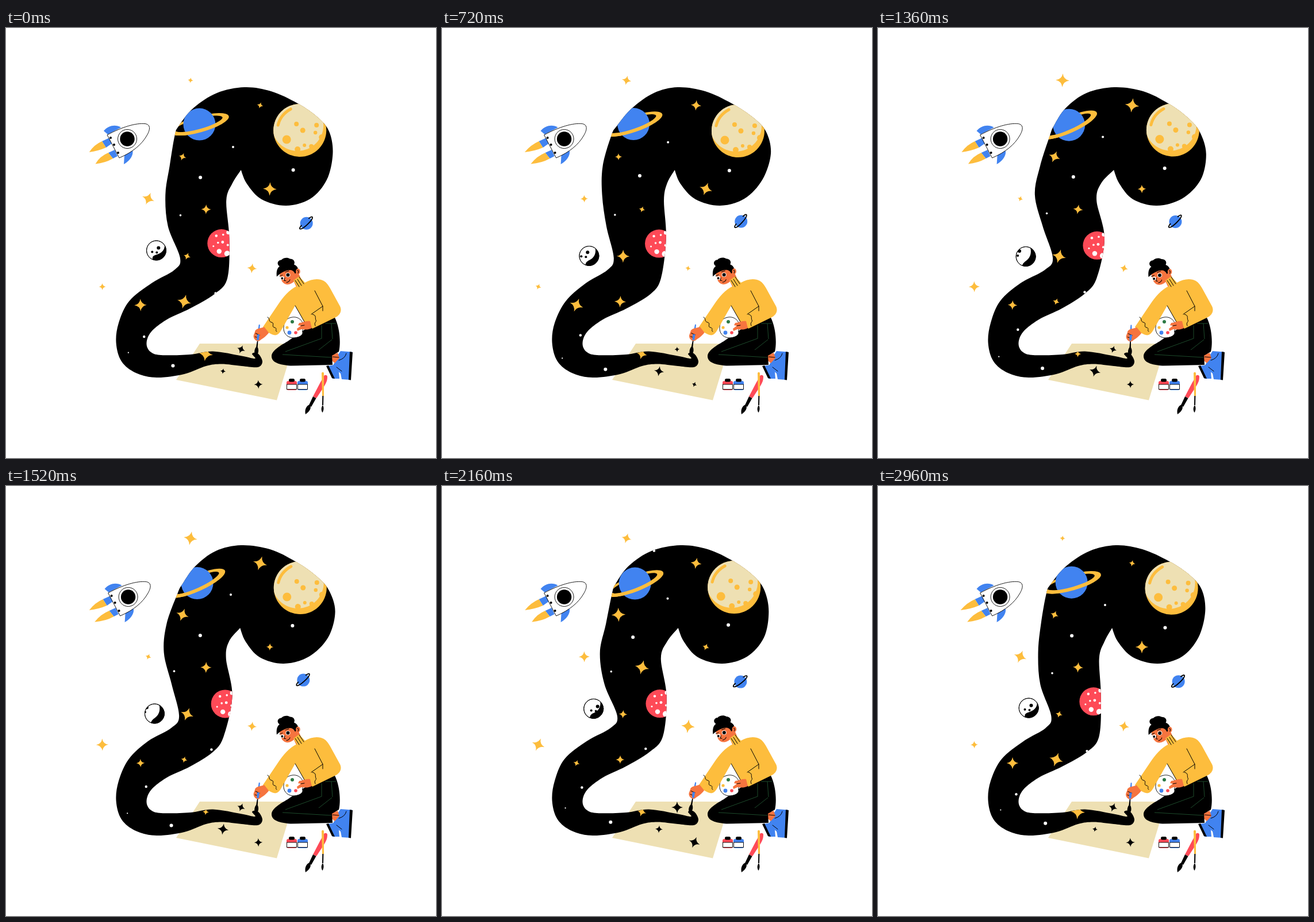
Recreate the animation shown at these times as an HTML page. Size 748x748 px, loop 3.04 s.

```html
<!DOCTYPE html>
<html lang="en">
<head>
<meta charset="utf-8">
<title>Painting space</title>
<style>
html, body { margin: 0; width: 100%; height: 100%; overflow: hidden; background: #fff; }
svg { display: block; width: 100vw; height: 100vh; }
.g { fill: #fdbd3d; } .b { fill: #4183f0; } .r { fill: #fe4a57; } .c { fill: #eee0b3; }
.o { fill: #f6743f; } .w { fill: #fff; } .k { fill: #000; }
.l { fill: none; stroke: #000; stroke-width: 1; stroke-linecap: round; stroke-linejoin: round; }
.d { fill: none; stroke: #1d4a2b; stroke-width: 1; }
.ol { stroke: #000; stroke-width: .9; }
</style>
</head>
<body>
<svg viewBox="0 0 748 748">
  <defs>
    <clipPath id="inBlob"><path id="blobClip"/></clipPath>
    <clipPath id="inMoon"><circle r="17"/></clipPath>
    <clipPath id="inGold"><circle r="46"/></clipPath>
    <clipPath id="inRed"><circle r="24.5"/></clipPath>
    <clipPath id="front"><rect x="-70" y="1" width="140" height="40"/></clipPath>
    <path id="ring" fill-rule="evenodd" d="M-53 0A53 14 0 0 1 53 0A53 14 0 0 1 -53 0ZM-44 -1A43 9 0 0 0 42 -1A43 9 0 0 0 -44 -1Z"/>
    <path id="star" d="M0 -1Q.14 -.14 1 0Q.14 .14 0 1Q-.14 .14 -1 0Q-.14 -.14 0 -1Z"/>
  </defs>

  <path class="c" d="M337 549H501L471 647.5L296 612Z"/>
  <path id="blob"/>

  <g clip-path="url(#inBlob)">
    <g id="saturn">
      <g class="tilt"><use href="#ring" class="g"/></g>
      <circle class="b" r="28"/>
      <g class="tilt"><g clip-path="url(#front)"><use href="#ring" class="g"/></g></g>
    </g>
    <g id="gold">
      <circle class="g" r="46"/>
      <g clip-path="url(#inGold)">
        <circle class="c" cx="-4" cy="-9" r="45"/>
        <g id="goldSpots" class="g"></g>
        <path d="M-38 -9Q-34 -27 -16 -37" fill="none" stroke="#fdbd3d" stroke-width="5" stroke-linecap="round"/>
      </g>
    </g>
    <g id="red">
      <circle class="r" r="24.5"/>
      <g id="redSpots" class="w" clip-path="url(#inRed)"></g>
    </g>
    <g id="dots" class="w"></g>
    <g id="inner" class="g"></g>
  </g>
  <g id="outer" class="g"></g>
  <g id="ink" class="k"></g>

  <g id="moon">
    <circle class="w ol" r="17"/>
    <g clip-path="url(#inMoon)">
      <path id="shade"/>
      <g id="craters"><circle r="3"/><circle cx="-11" cy="7" r="2"/><circle cx="-3" cy="8" r="2"/></g>
    </g>
    <circle class="l" r="17"/>
  </g>

  <g id="mini">
    <circle class="b" r="11"/>
    <path id="miniRing" class="l" d="M-9 -3.4C-18 -3 -18 2.5 0 2.5S18 -3 9 -3.4" style="stroke-width:1.8"/>
  </g>

  <g id="rocket">
    <path class="b" d="M170 179C179 168 192 168 200 173L177 185ZM205 237L206 221L219 210C224 219 216 231 205 237Z"/>
    <path class="b" d="M167 197L180 191L184 201L174 208ZM178 217L189 212L194 223L186 227Z"/>
    <path id="flames" class="g"/>
    <path class="w ol" d="M176 186C202 172 226 165 242 166.500C252 168 251 177 245 187C236 203 220 216 197 226Z"/>
    <circle class="w ol" cx="211" cy="193" r="16.500"/><circle cx="211" cy="193" r="12.700"/>
    <circle cx="182" cy="191" r="2"/><circle cx="188" cy="203" r="2"/><circle cx="195" cy="217" r="2"/>
  </g>

  <!-- boots, legs -->
  <path class="b" d="M559 588L571 586L579 598L580 610L568 610Z"/>
  <path d="M557 588L561 587L572 610L567 609Z"/>
  <path class="b" d="M576 571L582 562L602 563.500L599 612L584 611L582 601L568 588L573 580Z"/>
  <path d="M598 563L603 564L600 612.500L596 612Z"/>
  <path class="l" d="M579 578Q590 575 592 566M575 590L584 597"/>
  <path class="o" d="M566 569L577 565L580 574L572 583L566 578Z"/>
  <path class="l" d="M568 572L579 573"/>
  <path d="M526 520L571 502C580 518 583 546 579 563L567 570L568 586L495 587.500C476 586 462 582 462 571C462 561 478 552 490 545Z"/>
  <path class="d" d="M549 517V540L486 563M555 514H574M566 514L568 541M481 568L566 573M567 542L544 560"/>

  <!-- palette -->
  <path class="w ol" d="M494 504C506 500 515 507 517 516C519 524 514 525 516 529C517 535 508 539 499 539C488 538 482 530 483 520C484 511 488 506 494 504Z"/>
  <circle cx="498" cy="511" r="3" fill="#2c7a45"/><circle class="g" cx="489" cy="521" r="2.600"/>
  <circle class="b" cx="493" cy="530" r="3.400"/><circle class="r" cx="504" cy="530" r="2.800"/>

  <g id="head">
    <path class="o" d="M497 432L508 424L517 444L506 452Z"/>
    <path class="o" d="M475 425L480 440C484 446 490 447 496 444C503 441 506 434 506 427L504 416L483 415Z"/>
    <path d="M471 432C470 422 472 417 476 414C470 410 473 403 479 403C482 399 490 398 494 401C500 401 504 406 501 411C506 413 509 417 508 422L503 427C499 418 491 420 484 423C479 425 475 428 471 432Z"/>
    <ellipse class="o" cx="508" cy="423" rx="3.800" ry="5"/>
    <path class="l" d="M507 421Q510 422 508 426M485 434L484 439L487 439M476 431L481 429M486 424L492 422M488 442Q493 441 494 437"/>
    <g id="open">
      <ellipse class="w" cx="481" cy="434.500" rx="3" ry="3.200"/><circle cx="480.500" cy="435" r="2"/>
      <ellipse class="w" cx="490.500" cy="429" rx="4" ry="3.800"/><circle cx="490.500" cy="429" r="3"/>
    </g>
    <path id="shut" class="l" d="M477 433Q481 430 483 433M487 429Q491 425 495 428"/>
  </g>

  <!-- sweater -->
  <path class="g" d="M500 439L510 432L520 443C531 436 545 435 553 440C558 443 561 448 564 453L581 484C585 492 581 500 572 504L533 523L525 514L519 511L503 483L478 527C474 533 471 535 466 534C459 532 452 528 447 520L474 480C482 468 493 455 506 449Z"/>
  <path class="l" d="M503 439L510 450M507 437L514 448M510 433L518 445M503 483L519 511M537 457L551 484V492M551 484L531 498M455 503C460 505 456 511 462 512S461 520 467 521S467 527 471 528M533 498C541 500 537 504 539 508S535 511 538 518"/>
  <path class="o" d="M529 510L532 522C524 526 519 524 514 524L507 527L506 523L513 518L508 517L510 513C516 513 520 509 529 510Z"/>
  <path class="l" d="M513 518L519 517"/>

  <g id="hand">
    <g id="brush">
      <path class="b" d="M-1 -21Q0 -22 1 -21L2.200 7L-2.200 7Z"/>
      <path d="M-.8 7H.8L1.300 18C4.500 23 4 30 0 33C-4 30 -4.500 23 -1.300 18Z"/>
    </g>
    <path class="o" d="M449 521L457 531C452 538 446 541 441 545C436 547 432 543 431 540C429 535 433 532 433 528C436 523 441 524 449 521Z"/>
    <path class="l" d="M434 532L441 535M433 538L439 540"/>
    <path class="b" d="M436.500 534L441 534L439.500 544L436 544Z"/>
  </g>

  <!-- ink and spare brushes -->
  <g id="jar">
    <rect x="488" y="614" width="18" height="16" rx="3"/>
    <rect class="k" x="492" y="610" width="10" height="5.500" rx="2.500"/>
    <rect class="w ol" x="488.500" y="620" width="17" height="8.500"/>
  </g>
  <path class="r" d="M554 604Q559 603 559 607C559 614 556 619 553 624L540 644L534 641L546 618Z"/>
  <path d="M534 641L539.500 644L531 659L527 656ZM528 655C533 661 527 668 521 672C519 663 523 657 528 655Z"/>
  <path class="g" d="M549 600Q551 597 553 600L553 640L550 640Z"/>
  <path d="M550.300 640H552.400L552 656H550ZM551 656C554 661 552 667 550.500 669C548 665 548 660 551 656Z"/>
</svg>

<script>
const LOOP = 3040, STEP = 80, TAU = Math.PI * 2, RAD = Math.PI / 180;
const $ = id => document.getElementById(id);
const place = (el, x, y, more = '') => el.setAttribute('transform', `translate(${x} ${y}) ${more}`);
const clamp = v => Math.max(0, Math.min(1, v));

// one swing per loop, highest at the given time
const swing = (t, peak) => Math.cos(TAU * (t - peak) / LOOP);

function add(parent, tag, attrs) {
  const el = document.createElementNS('http://www.w3.org/2000/svg', tag);
  for (const k in attrs) el.setAttribute(k, attrs[k]);
  return $(parent).appendChild(el);
}

// resting outline, clockwise from the notch
const OUTLINE = `408,247 418,271 443,298 485,309 528,297 559,264 570.5,219 562,181 541,156
  505,131 460,110 412,103 366,113 328,139 304,170 296,187 282,240 276,290 285,345 302,400
  290,421 250,444 214,475 196,513 191.6,548 201,580 226,600 262,608 310,602 348,588 375,584.5
  410,588 438,590 446,581 441,569 434,564.5 428,567 433,575 410,570.5 360,562.5 320,568 270,569
  251,563 244.5,548 253,528 280,507 320,488 361,463 382,435 391,365 383,300 391,270 408,247`
  .split(/\s+/).map(p => p.split(',').map(Number));

// a wave runs down the body; the hanging bulge lags behind it
function sway([x, y], t) {
  const lag = 140 - 2 * (y - 187) + 130 * clamp((x - 395) / 30);
  const size = (x > 420 ? 2.3 : 3.2) * clamp((500 - y) / 50);
  return [x + size * Math.cos(TAU * 3 * t / LOOP - lag * RAD), y];
}

function blobPath(t) {
  const p = OUTLINE.map(q => sway(q, t));
  let d = 'M' + p[0];
  for (let i = 0; i < p.length - 1; i++) {
    const q = p[i], r = p[i + 1], before = p[i - 1] || q, after = p[i + 2] || r;
    const c1 = q.map((v, k) => v + (r[k] - before[k]) / 6);
    const c2 = r.map((v, k) => v - (after[k] - q[k]) / 6);
    d += `C${c1} ${c2} ${r}`;
  }
  return d + 'Z';
}

// each star: x, y, time of greatest size
const STARS = {
  outer: [[321, 91, 1480], [247.5, 297, 2750], [428, 418, 2300], [167.5, 450, 1950]],
  inner: [
    [442, 134.5, 1480], [307, 224, 1950], [348, 315.5, 2200], [459, 280, 330],
    [315, 397, 1150], [310, 476, 100], [234, 482, 500], [347.5, 567, 0]
  ],
  ink: [[409, 559, 2300], [377.5, 597, 1250], [439, 620, 2300]]
};
const RANGE = { outer: [8.3, 3.6], inner: [9, 3.5], ink: [7.3, 2.8] };
const stars = Object.keys(STARS).flatMap(group => STARS[group].map(([x, y, peak]) =>
  ({ x, y, peak, range: RANGE[group], el: add(group, 'use', { href: '#star' }) })));

// each dot: radius, x, y, drift in x and y, time of furthest drift
const dots = [
  [2, 393, 198, 2, 9, 0], [3, 338, 260, 6, -3, 750], [3, 499, 245, 1, 3.5, 450],
  [1.8, 298, 324, 6, 2, 200], [2.2, 361, 460, 7, 3, 500], [2.2, 242, 530, -2, 8, 250],
  [1.1, 212, 567, -3, 8, 900], [3, 289, 589, -5, 5, 900], [2.2, 368, 104, 1, 9, 2300]
].map(([r, x, y, dx, dy, peak]) => ({ x, y, dx, dy, peak, el: add('dots', 'circle', { r }) }));

const spots = (id, list) => list.forEach(([cx, cy, r]) => add(id, 'circle', { cx, cy, r }));
spots('goldSpots', [
  [-23, 16, 7.5], [-6, -11, 4], [5, 0, 4.5], [29, -9, 4], [27, 4, 3.2], [8, 26, 3], [-4, 33, 5], [20, 28, 4], [38, 12, 5]
]);
spots('redSpots', [
  [-4, 14, 4.2], [10, 18, 5], [-6, -1, 1.8], [2, -2, 2.4], [-9, -13, 2.2], [3, -15, 1.8], [-14, 5, 1.5], [12, -19, 3.5], [11, 3, 2]
]);

// x, y, reach in x and y, times of furthest reach
const ORBITS = {
  saturn: [334.5, 168.3, 2.5, 1.4, 2700, 2000],
  gold: [511.5, 177.5, 3.5, 1.5, 800, 600],
  red: [378, 376.7, 3.2, 2.6, 1550, 1800],
  moon: [260, 391.5, 4.5, 7, 2450, 1100],
  mini: [520, 338.7, 2.7, 2.5, 0, 2500]
};
const tilts = document.querySelectorAll('.tilt');

function drawPlanets(t) {
  for (const id in ORBITS) {
    const [x, y, dx, dy, px, py] = ORBITS[id];
    place($(id), x + dx * swing(t, px), y + dy * swing(t, py));
  }
  tilts.forEach(el => el.setAttribute('transform', `rotate(${-20 + 4.5 * swing(t, 50)})`));
  $('miniRing').setAttribute('transform', `rotate(${-43 - 5 * swing(t, 700)})`);
  const x = 10 + 3 * swing(t, 2900), u = (t + 1000) % LOOP / LOOP;
  $('shade').setAttribute('d', `M${x} -18C${x + 5} -4 ${x - 2} 4 1 7S-6 12 -7 18H18V-18Z`);
  place($('craters'), 7 - 30 * u * u, -4 - 12 * u ** 3);
}

function drawRocket(t) {
  place($('rocket'), .8 - .8 * Math.cos(Math.PI * t / STEP), 0);
  const a = TAU * 11 * t / LOOP;
  const p = 144 + 2 * Math.sin(a + .4), q = 154 + 1.5 * Math.cos(a);
  $('flames').setAttribute('d',
    `M167 197L174 208Q160 214 ${p} 216Q153 203 167 197ZM178 217L186 227Q172 235 ${q} 236.500Q163 223 178 217Z`);
}

function drawPainter(t) {
  const s = Math.sin(TAU * 2 * t / LOOP - .1);
  place($('hand'), -1.7 * s, -1 - s);
  place($('brush'), 438.3, 538, `rotate(${7 + 6.5 * s})`);
  place($('head'), .4 * s, .5 - .7 * s, `rotate(${.8 * s} 508 445)`);
  const shut = t >= 320 && t <= 480;
  $('open').style.display = shut ? 'none' : '';
  $('shut').style.display = shut ? '' : 'none';
}

function draw(t) {
  const d = blobPath(t);
  $('blob').setAttribute('d', d);
  $('blobClip').setAttribute('d', d);
  stars.forEach(({ x, y, peak, range, el }, i) => {
    const turn = 10 + 12 * Math.sin(TAU * 2 * t / LOOP + i * 1.7);
    place(el, x, y, `rotate(${turn}) scale(${range[0] + range[1] * swing(t, peak)})`);
  });
  dots.forEach(p => {
    const w = swing(t, p.peak);
    place(p.el, p.x + p.dx * w, p.y + p.dy * w);
  });
  drawPlanets(t);
  drawRocket(t);
  drawPainter(t);
}

// the second jar is a blue copy of the first
const jar = $('jar').cloneNode(true);
jar.removeAttribute('id');
$('jar').setAttribute('class', 'r');
jar.setAttribute('class', 'b');
place(jar, 19, 0);
$('jar').after(jar);

const start = performance.now();
function tick() {
  const t = (performance.now() - start) % LOOP;
  draw(Math.floor(t / STEP) * STEP);
  requestAnimationFrame(tick);
}
tick();
</script>
</body>
</html>
```
